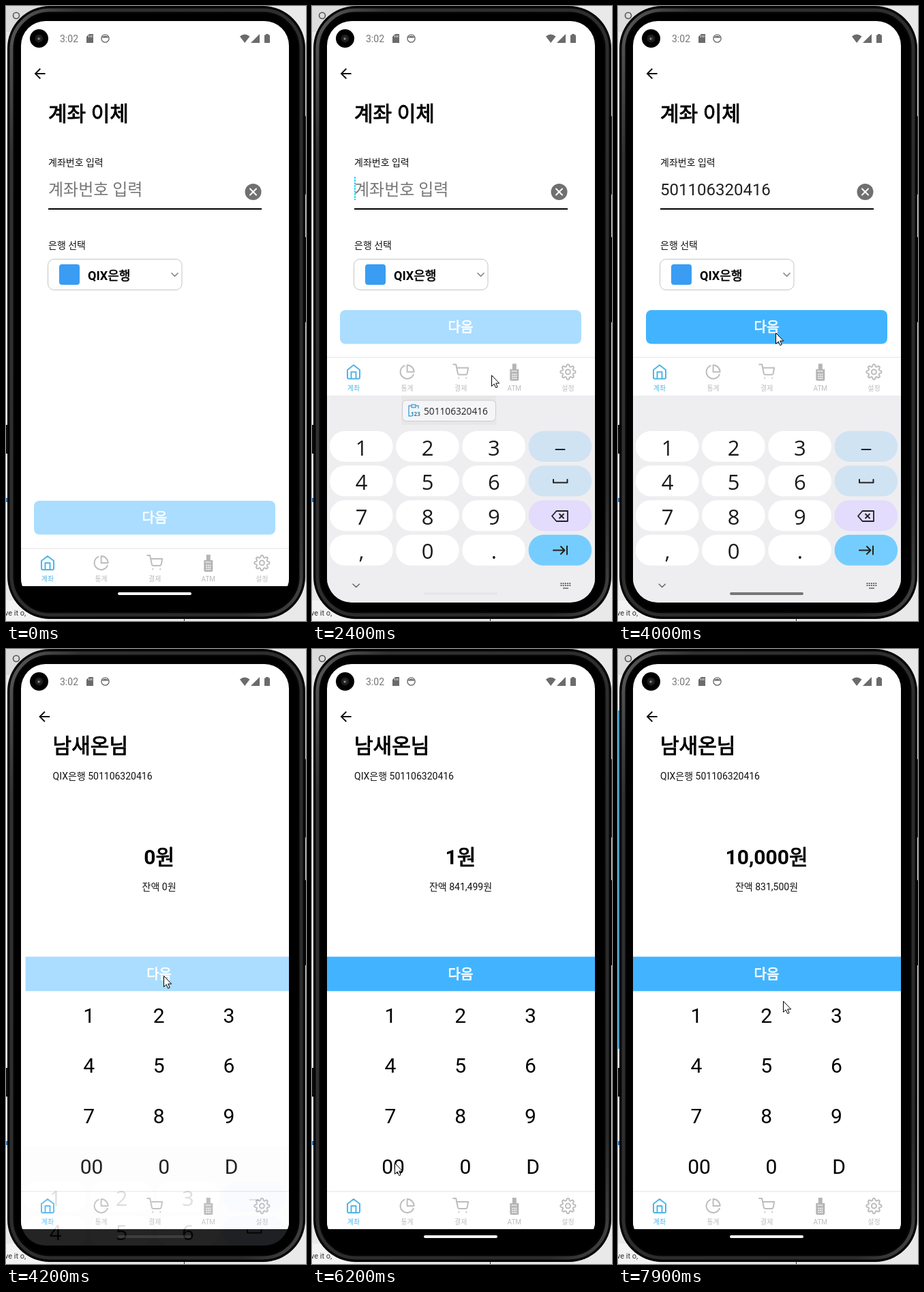
An HTML page that plays this animation: 440x900 px, repeating every 8000 ms.

```html
<!DOCTYPE html>
<html lang="ko">
<head>
<meta charset="utf-8">
<title>계좌 이체</title>
<style>
html, body { margin: 0; width: 100%; height: 100%; overflow: hidden; background: #e9e9e9; }
svg { display: block; width: 440px; height: 900px; }
text { font-family: Roboto, "Noto Sans CJK KR", "Noto Sans CJK", sans-serif; white-space: pre; }
.pad text { font-family: "Open Sans", "Noto Sans", sans-serif; }
.line { fill: none; stroke-width: 2; stroke-linecap: round; stroke-linejoin: round; }
.swell { font-weight: 400; stroke-width: .033em; }
</style>
</head>
<body>
<svg viewBox="0 0 440 900">
  <defs>
    <clipPath id="glass"><rect x="22" y="22" width="393" height="851" rx="36"/></clipPath>
    <linearGradient id="rim" x1="0" y1="0" x2="1" y2="1">
      <stop offset="0" stop-color="#5a5a5a"/><stop offset=".12" stop-color="#303030"/>
      <stop offset=".9" stop-color="#2a2a2a"/><stop offset="1" stop-color="#444"/>
    </linearGradient>
  </defs>

  <g id="desk">
    <rect width="440" height="900" fill="#e9e9e9"/>
    <rect width="60" height="38" fill="#dcdcdc"/>
    <circle cx="15" cy="14" r="4.5" fill="none" stroke="#555" stroke-width="1.6"/>
    <rect id="strip" y="90" width="3" height="495" fill="#4b9fc4"/>
    <rect y="613" width="3" height="42" fill="#111"/>
    <rect y="720" width="3" height="6" fill="#3877b8"/>
    <rect y="870" width="60" height="30" fill="#f3f3f3"/>
    <text x="-2" y="892" font-size="11" fill="#333">ve it o,</text>
    <rect x="261" y="896" width="1" height="4" fill="#333"/>
  </g>

  <g id="phone">
    <rect x="435" y="161" width="5" height="115" rx="1" fill="#333"/>
    <rect x="435" y="338" width="5" height="125" rx="1" fill="#0a0a0a"/>
    <rect x="2" y="0" width="437" height="897" rx="62" fill="#050505"/>
    <rect x="8" y="6" width="425" height="885" rx="56" fill="none" stroke="url(#rim)" stroke-width="5"/>
    <rect x="13" y="11" width="415" height="875" rx="51" fill="#000"/>
  </g>

  <g clip-path="url(#glass)">
    <rect x="22" y="22" width="393" height="827" fill="#fff"/>
    <g id="form"></g>
    <g id="detail"></g>
    <g id="tabs"></g>
    <rect x="22" y="849" width="393" height="24" fill="#000"/>
    <rect id="home" x="164" y="858" width="108" height="4" rx="2" fill="#fff"/>
    <g id="pad" class="pad"></g>
    <g id="status"></g>
  </g>

  <path id="cursor" d="M.5 .5v16l3.7-3.5 2.5 5.6 2.5-1.1-2.5-5.4h5z" fill="#fff" stroke="#000"/>
</svg>

<script>
const $ = id => document.getElementById(id);
const LOOP = 8000, TICK = 100;
const BANK = 'QIX은행', OWNER = '남새온', ACCOUNT = '501106320416';
const SKY = '#42b4ff', PALE = '#aaddff';

// Bold Hangul is the regular face thickened by a thin outline.
const bold = (str, fill = '#000') => str.replace(/[가-힣]+/g, `<tspan class="swell" stroke="${fill}">$&</tspan>`);
const text = (x, y, size, str, { fill = '#000', weight = 400, mid, id } = {}) =>
  `<text x="${x}" y="${y}" font-size="${size}" fill="${fill}" font-weight="${weight}"` +
  ` text-anchor="${mid ? 'middle' : 'start'}" ${id ? `id="${id}"` : ''}>${weight > 400 ? bold(str, fill) : str}</text>`;
const rect = (x, y, w, h, fill, r = 0, extra = '') =>
  `<rect x="${x}" y="${y}" width="${w}" height="${h}" rx="${r}" fill="${fill}" ${extra}/>`;
const line = (d, stroke, extra = '') => `<path class="line" d="${d}" stroke="${stroke}" ${extra}/>`;
const show = (id, on) => $(id).style.display = on ? '' : 'none';
const shift = (id, x, y) => $(id).setAttribute('transform', `translate(${x} ${y})`);

const back = '<path transform="translate(37.6 87)" fill="#111" d="M20 11H7.800l5.600-5.600L12 4l-8 8 8 8 1.400-1.400L7.800 13H20z"/>';

$('status').innerHTML =
  `<circle cx="48.5" cy="47.500" r="13.500" fill="#000"/><circle cx="48.5" cy="47.5" r="6" fill="#1c1c1c"/>
   <circle cx="48.5" cy="47.5" r="3" fill="#333"/><circle cx="48" cy="48" r="1.3" fill="#999"/>` +
  text(79, 53, 14, '3:02', { fill: '#757575' }) +
  `<g fill="#6b6b6b"><path d="M122 41h6v13h-10v-9z"/>
   <path d="M343 44.5q7-6 14.500 0L350.200 54z"/><path d="M372 41v13h-13z"/>
   <path d="M379 42.500h2v-1.500h4v1.500h2V54h-8z"/></g>
   <path d="M121.500 43v3M124 43v3M126 43v3" stroke="#fff" stroke-width=".8"/>
   <circle cx="145.500" cy="47.500" r="5.600" fill="none" stroke="#6b6b6b" stroke-width="1.400"/>
   <path d="M140 46.500q5.500-6 11 0z" fill="#6b6b6b"/>`;

$('form').innerHTML = back +
  text(62, 168, 30, '계좌 이체', { weight: 700 }) +
  text(62, 234, 14, '계좌번호 입력', { fill: '#111' }) +
  text(62, 277, 24, '계좌번호 입력', { fill: '#777', id: 'hint' }) +
  text(62, 276.5, 24, ACCOUNT, { fill: '#222', id: 'number' }) +
  `<path id="caret" d="M0 250v34" stroke="#36d3ef" stroke-width="2" stroke-dasharray="3 1"/>` +
  rect(62, 296, 313, 2, '#000') +
  `<circle cx="362.5" cy="272" r="12" fill="#707070"/>` +
  line('M358 267.500l9 9m0-9l-9 9', '#fff') +
  text(62, 355, 14, '은행 선택', { fill: '#111' }) +
  rect(61.5, 370.5, 196.5, 45, '#fff', 9, 'stroke="#c4c4c4"') +
  rect(78, 378, 30, 30, '#3a9df3', 4) +
  text(120, 401, 18, BANK, { weight: 700 }) +
  line('M243 391l4.500 4.500 4.500-4.500', '#888', 'style="stroke-width:1.700"') +
  `<g id="next">${rect(41, 724, 354, 49.5, PALE, 8, 'id="nextFill"')}` +
  text(218, 756, 20, '다음', { fill: '#fff', weight: 700, mid: 1 }) + '</g>';

const keypad = [...'123456789'].map((n, i) =>
  text(115 + (i % 3) * 102.7, 547 + Math.floor(i / 3) * 73.4, 30, n, { mid: 1 })).join('') +
  text(119, 767.5, 30, '00', { mid: 1 }) + text(225, 767.5, 30, '0', { mid: 1 }) + text(324, 767.5, 30, 'D', { mid: 1 });

$('detail').innerHTML = rect(22, 72, 393, 777, '#fff') + back +
  text(62, 152, 30, OWNER + '님', { weight: 700 }) +
  text(62, 191, 14, `${BANK} ${ACCOUNT}`, { fill: '#111' }) +
  text(218, 315, 30, '', { weight: 700, mid: 1, id: 'amount' }) +
  text(218, 353, 14, '', { fill: '#111', mid: 1, id: 'balance' }) +
  rect(22, 450.3, 393, 50.4, PALE, 0, 'id="sendFill"') +
  text(218, 483, 20, '다음', { fill: '#fff', weight: 700, mid: 1 }) + keypad;

// Gear outline: a circle whose radius swells eight times.
const gear = 'M' + Array.from({ length: 96 }, (_, i) => {
  const a = i / 96 * 2 * Math.PI, r = 9.6 + 1.5 * Math.tanh(2 * Math.cos(8 * a));
  return `${(12 + r * Math.cos(a)).toFixed(1)} ${(12 + r * Math.sin(a)).toFixed(1)}`;
}).join('L') + 'Z';
const GREY = '#bdbdbd', ACTIVE = '#4db5ea';
const tabs = [
  ['계좌', line('M3 9l9-7 9 7v11a2 2 0 0 1-2 2H5a2 2 0 0 1-2-2zM8.500 22V12h7v10', ACTIVE)],
  ['통계', line('M21.200 15.900A10 10 0 1 1 8 2.800M22 12A10 10 0 0 0 12 2v10z', GREY)],
  ['결제', line('M1 1h4l2.700 13.400a2 2 0 0 0 2 1.600h9.700a2 2 0 0 0 2-1.600L23 6H6M9 21h.1M20 21h.1', GREY)],
  ['ATM', `<path fill="#b5b5b5" d="M9 0h6v8h3.500v15q0 2-2 2h-9q-2 0-2-2V8H9z"/>
    <path d="M8 11h8M8.500 15.500h7M8.500 18.500h7M8.500 21.500h7" stroke="#fff" stroke-width="1.500" stroke-dasharray="1.800 .8"/>`],
  ['설정', line(gear, GREY) + `<circle class="line" cx="12" cy="12" r="3.5" stroke="${GREY}"/>`]
];
$('tabs').innerHTML = rect(22, 794, 393, 55, '#fff') + rect(22, 793, 393, 1.5, '#ececec') +
  tabs.map(([name, icon], i) => {
    const x = 61 + i * 78.6;
    return `<g transform="translate(${x - 12} 803)">${icon}</g>` +
      text(x, 842, 10, name, { fill: i ? GREY : ACTIVE, mid: 1 });
  }).join('');

const sideKeys = ['#d0e3f3', '#d0e3f3', '#e3dcfc', '#75cdff'];
const padKeys = ['123', '456', '789', ',0.'].map((row, r) => {
  const y = 622 + r * 50.6;
  return [...row].map((c, i) => rect(26 + i * 97.2, y, 92.5, 45, '#fff', 22) +
    text(72.5 + i * 97.2, y + 35.5, 31, c, { fill: '#1b1b1e', mid: 1 })).join('') +
    rect(317.6, y, 92.5, 45, sideKeys[r], 22);
}).join('');
$('pad').innerHTML = rect(22, 570, 393, 310, '#eeeef1') +
  `<g id="chip">${rect(131, 570, 139, 43, '#e7e7ea')}${rect(132.5, 577, 137, 30.5, '#f5f5f8', 6, 'stroke="#cbcbcf"')}` +
  `<path d="M146 585h-4v15h5M152 585h4v4M146 583.500h6v4h-6z" fill="none" stroke="#4fa9d6" stroke-width="1.500"/>` +
  text(145, 600, 8, '123', { fill: '#2b86b5', weight: 700 }) +
  text(164, 597.5, 13.7, ACCOUNT, { fill: '#222' }) + '</g>' + padKeys +
  line('M357.500 649h13', '#222', 'stroke-linecap="butt"') +
  line('M354 693v4.500h20.500V693', '#222') +
  line('M358.500 739H375v15h-16.500l-6.500-7.500zM363 743.500l6 6m0-6l-6 6', '#222', 'style="stroke-width:1.800"') +
  line('M354 796.500h16M365 791l5.500 5.500-5.500 5.500M374 790.500v12', '#222') +
  line('M60 846l4.700 4.500 4.700-4.500', '#666', 'style="stroke-width:1.500"') +
  `<path d="M364.500 845h15M364.500 848h15" stroke="#666" stroke-width="1.800" stroke-dasharray="2 1.200"/>
   <path d="M368 852h8" stroke="#666" stroke-width="1.500"/>`;

// Rows of [time, value...], read with linear interpolation.
const pointer = [
  [1200, -15, 300], [1500, 150, 250], [1700, 173, 237], [1800, 171, 260], [2000, 170, 268],
  [2200, 205, 390], [2400, 263, 540], [2600, 235, 605], [2700, 192, 623], [2900, 188, 593],
  [3100, 188, 593], [3300, 198, 565], [3700, 231, 478], [4400, 231, 478], [4800, 150, 500],
  [4900, 122, 535], [5300, 118, 537], [5800, 121, 752], [7500, 121, 752], [7900, 242, 515]
];
const padMotion = [
  [1900, 303, 1], [2000, 220, 1], [2100, 90, 1], [2200, 15, 1], [2300, 0, 1],
  [4000, 0, 1], [4100, 60, .7], [4200, 157, .14], [4300, 240, 0]
];
const slide = [[4000, 393], [4100, 90], [4200, 6.6], [4300, 0]];
const homeFade = [[2400, .06], [2700, 1], [4000, 1], [4200, .3]];
const sums = [[0, 0], [5200, 1], [6500, 100], [7600, 10000]];

function at(rows, t) {
  const i = rows.findIndex(r => r[0] > t);
  if (i < 1) return (i ? rows[rows.length - 1] : rows[0]).slice(1);
  const a = rows[i - 1], b = rows[i], k = (t - a[0]) / (b[0] - a[0]);
  return a.slice(1).map((v, j) => v + (b[j + 1] - v) * k);
}
const within = (t, a, b) => t >= a && t < b;
const won = n => n.toLocaleString('en-US') + '원';

function draw(t) {
  const pasted = t >= 3200, raised = within(t, 2200, 4100) ? -279 : 0;
  const [px, py] = at(pointer, t);
  shift('cursor', px, py);
  show('cursor', t > 1200);

  show('hint', !pasted);
  show('number', pasted);
  show('caret', within(t, 2200, 2700) || within(t, 3200, 3700));
  shift('caret', pasted ? 224 : 63, 0);
  $('nextFill').setAttribute('fill', pasted ? SKY : PALE);
  shift('next', 0, raised);
  shift('tabs', 0, raised && raised - .5);

  const [dy, alpha] = at(padMotion, t), typing = within(t, 2000, 4300);
  show('pad', typing);
  shift('pad', 0, dy);
  $('pad').setAttribute('opacity', alpha);
  show('chip', !pasted);
  // The home bar stays put and turns dark above the keyboard.
  const home = $('home');
  $('pad').parentNode.insertBefore(home, typing ? $('status') : $('pad'));
  home.setAttribute('fill', typing ? '#777' : '#fff');
  home.setAttribute('opacity', typing ? at(homeFade, t)[0] : 1);

  show('form', t < 4300);
  show('detail', t > 4000);
  shift('detail', at(slide, t)[0], 0);
  const sum = sums.filter(s => s[0] <= t).pop()[1];
  $('amount').innerHTML = bold(won(sum));
  $('balance').textContent = '잔액 ' + won(t < 4500 ? 0 : 841500 - sum);
  $('sendFill').setAttribute('fill', sum ? SKY : PALE);
  show('strip', t >= 7000);
}

const start = performance.now();
function loop() {
  const t = (performance.now() - start) % LOOP;
  draw(Math.floor(t / TICK) * TICK);
  requestAnimationFrame(loop);
}
loop();
</script>
</body>
</html>
```
